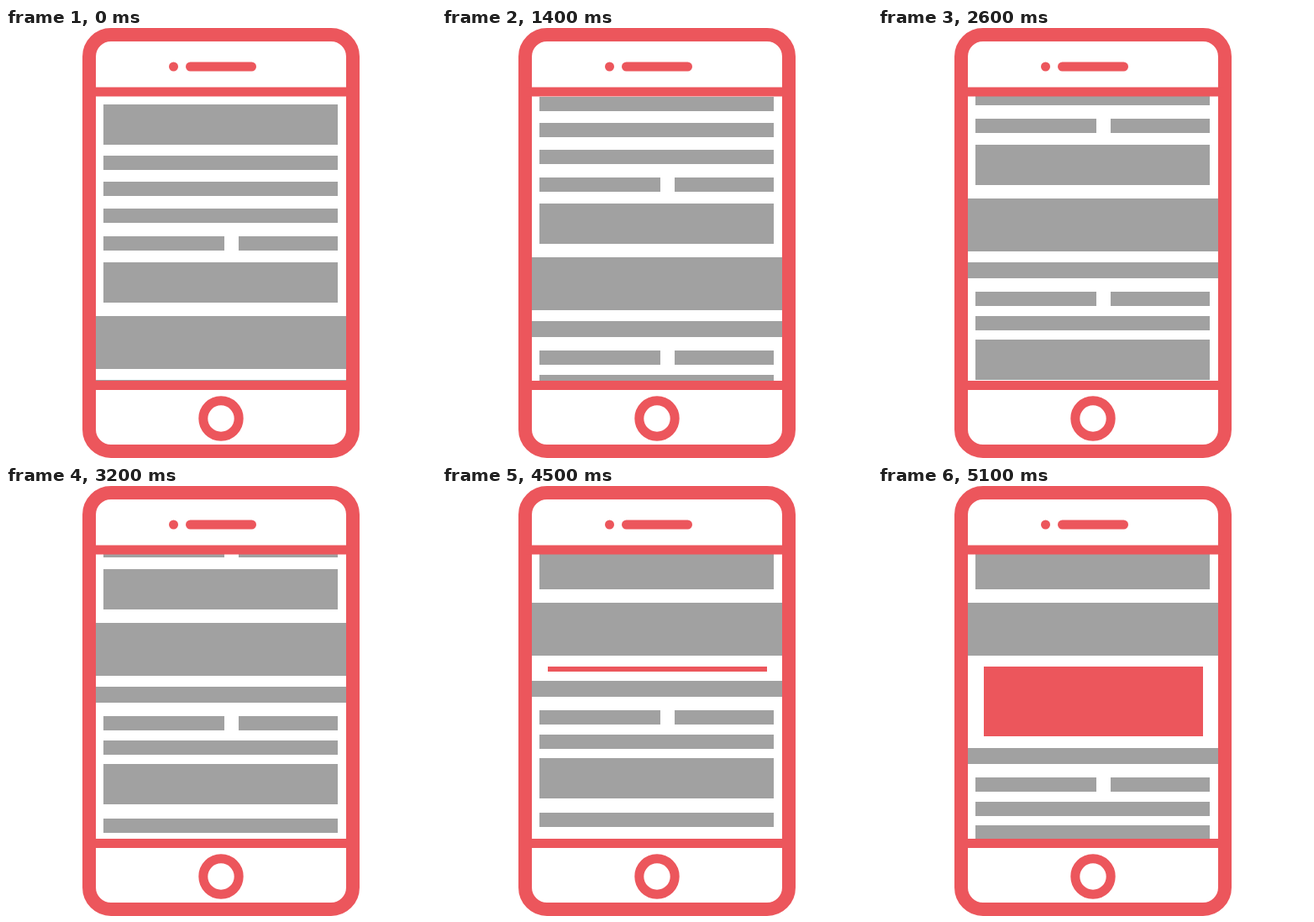
An HTML page with a canvas for the animation above (5.6 s loop, 512 px wide and 512 px high).

```html
<!DOCTYPE html>
<html>
<head>
<meta charset="utf-8">
<style>
  html, body { margin: 0; height: 100%; overflow: hidden; background: #fff; }
  canvas { display: block; }
</style>
</head>
<body>
<canvas id="stage" width="512" height="512"></canvas>
<script>
const ctx = document.getElementById('stage').getContext('2d');
const RED = '#ec565c', GRAY = '#a1a1a1';
const LOOP = 5600, AD_START = 4500, AD_TOP = 215;

// Horizontal spans as [left, right]
const full = [[107, 405]], inset = [[116, 395]], split = [[116, 260], [277, 395]];

// Page blocks as [top, height, spans]
const above = [
  [91, 48, inset], [152, 17, inset], [183, 17, inset], [215, 17, inset],
  [248, 17, split], [279, 48, inset], [343, 63, full]
];
const below = [
  [419, 19, full], [454, 17, split], [483, 17, inset],
  [511, 48, inset], [576, 17, inset], [607, 17, inset]
];

function scrollAt(t) {
  const step = Math.floor(t / 200);
  if (step >= 18) return 204;
  return 10 * (step + (step >= 10) + (step >= 14));
}

function drawBlocks(blocks, shift) {
  ctx.fillStyle = GRAY;
  for (const [top, height, spans] of blocks)
    for (const [left, right] of spans)
      ctx.fillRect(left, top + shift, right - left, height);
}

function drawPage(t) {
  const scroll = scrollAt(t);
  let push = 0;
  ctx.save();
  ctx.beginPath();
  ctx.rect(107, 81, 298, 339);
  ctx.clip();
  if (t >= AD_START) {
    const step = Math.min(6, Math.floor((t - AD_START) / 100));
    push = Math.round(17 + step * 80 / 6);
    ctx.fillStyle = RED;
    ctx.fillRect(126, AD_TOP, 261, Math.round(6 + step * 77 / 6));
  }
  drawBlocks(above, -scroll);
  drawBlocks(below, push - scroll);
  ctx.restore();
}

function roundRect(x, y, w, h, r) {
  ctx.beginPath();
  ctx.roundRect(x, y, w, h, r);
}

function drawPhone() {
  ctx.fillStyle = ctx.strokeStyle = RED;
  ctx.lineWidth = 16;
  roundRect(99, 8, 314, 496, 26);
  ctx.stroke();
  ctx.fillRect(100, 70.5, 312, 11);
  ctx.fillRect(100, 420, 312, 11);
  roundRect(214, 40.5, 84, 11, 5.5);
  ctx.fill();
  ctx.beginPath();
  ctx.arc(199.5, 46, 5.5, 0, 7);
  ctx.fill();
  ctx.lineWidth = 11;
  ctx.beginPath();
  ctx.arc(256, 465, 21.2, 0, 7);
  ctx.stroke();
}

function frame(now) {
  ctx.fillStyle = '#fff';
  ctx.fillRect(0, 0, 512, 512);
  drawPage(now % LOOP);
  drawPhone();
  requestAnimationFrame(frame);
}
frame(0);
</script>
</body>
</html>
```
